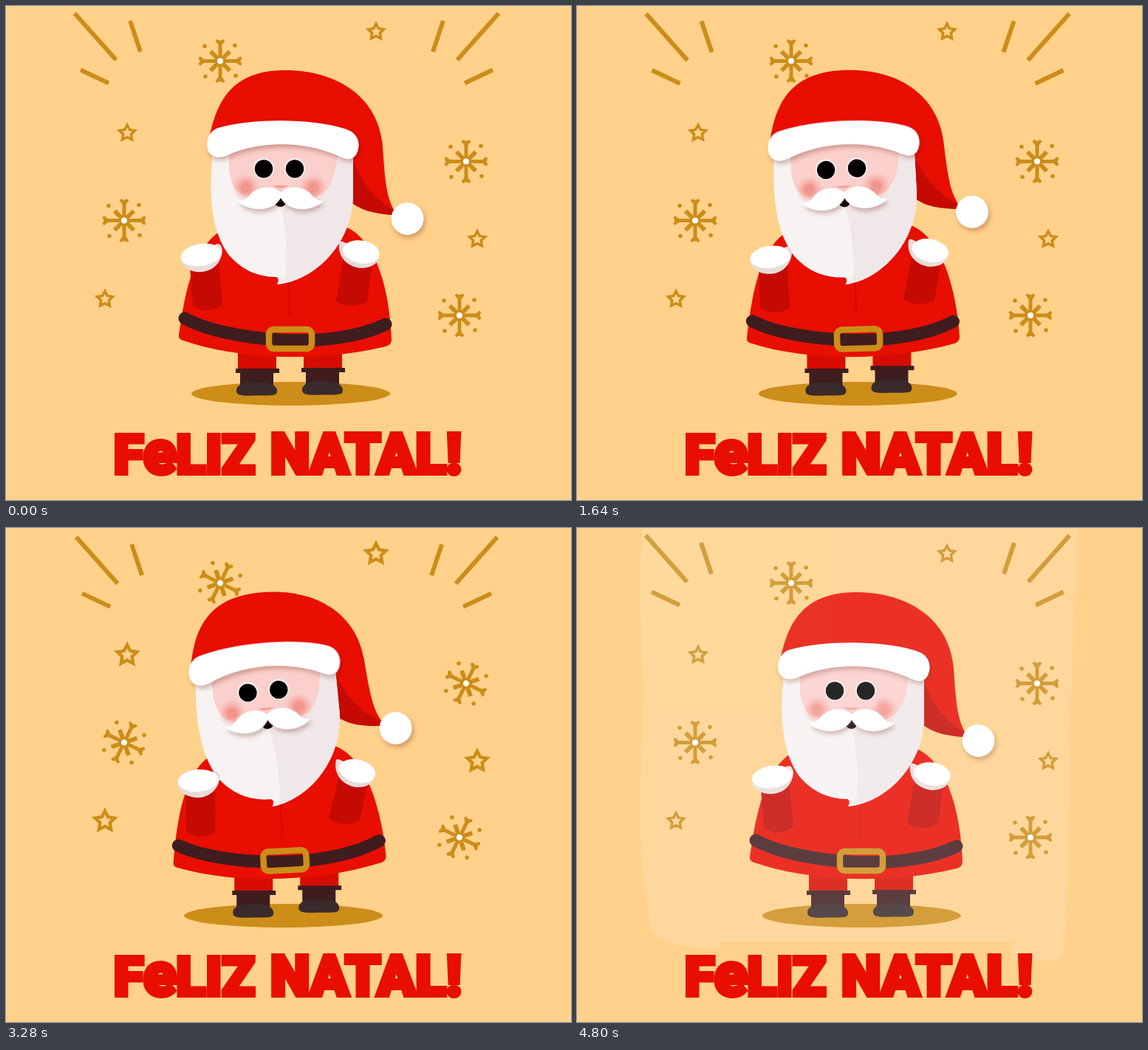
These frames come from a looping animation (765x669 px, 4840 ms). An HTML page without scripts:

```html
<!DOCTYPE html>
<html lang="pt">
<head>
<meta charset="utf-8">
<title>Feliz Natal!</title>
<style>
  @property --t { syntax: '<angle>'; inherits: true; initial-value: 0deg; }

  html, body { margin: 0; width: 100%; height: 100%; overflow: hidden; background: #ffd18b; }

  /* --t advances 18deg per 40ms step: one sway every 800ms */
  svg {
    display: block; width: 765px; height: 669px;
    animation: clock 4840ms steps(121) -2ms infinite;
    --s: calc(-1 * sin(var(--t)));
    --up: calc(1 - cos(var(--t)));
  }
  @keyframes clock { to { --t: 2178deg; } }

  .red { fill: #e80e00; }
  .dark { fill: #c50a04; }
  .maroon { fill: #3f1c1e; }
  .gold { fill: #cc8d19; }
  .white { fill: #fff; }
  .line { fill: none; stroke: #cc8d19; }
  .lift { filter: drop-shadow(2px 4px 3px rgba(110, 30, 20, .32)); }

  .rays { stroke-width: 6; transform: translate(calc(var(--in) * var(--up)), calc(11.2px * var(--up))); }
  .spin { animation: spin 4840ms -2ms infinite; }
  .star {
    stroke-width: 3.5;
    scale: calc(1.13 - .13 * clamp(-1, 20 * sin(var(--t) * 2 / 3 + 5deg), 1));
  }

  .shadow { transform: translateX(calc(17px * var(--s) + 1px * var(--up))); }
  .leg {
    transform: translate(calc(8.5px * var(--s) + 1.2px * var(--up)),
      calc(-1px * clamp(0, 5 * var(--up) + 8 * var(--side) * var(--s), 12)));
  }
  .body {
    transform-origin: 387px 447px;
    transform: translate(calc(13.3px * var(--s) + 1.3px * var(--up)), calc(-3.8px * var(--up)))
      rotate(calc(5.2deg * var(--s)));
  }
  .arm { transform: rotate(calc(-12.7deg * var(--s) + 1.8deg * var(--side) * var(--up))); }
  /* the head leans a little further to the right than to the left */
  .head {
    transform-origin: 369px 377px;
    transform: translate(calc(11px * var(--s) + 1.3px * var(--up)),
      calc(-3.6px * var(--up) - 1.8px * var(--s) - 1.5px * var(--s) * var(--s)))
      rotate(calc(10.8deg * var(--s) + 2deg * var(--s) * var(--s)));
  }

  .veil { fill: #fff; opacity: 0; animation: veil 4840ms linear -2ms infinite; }
  .title {
    font: 900 73px Roboto, sans-serif;
    fill: #e80e00; stroke: #e80e00; stroke-width: 6; stroke-miterlimit: 3;
  }

  @keyframes spin {
    0%, 9.9%, 33%, 59.5%, 82.6%, 100% { rotate: 0deg; }
    12.4%, 25%, 62%, 74.6% { rotate: 26deg; }
    28.1%, 78.2% { rotate: -4deg; }
  }
  @keyframes veil { 0%, 90.5% { opacity: 0; } 99.1%, 100% { opacity: .15; } }
</style>
</head>
<body>
<svg viewBox="0 0 765 669">
  <defs>
    <path id="rays" class="line" d="M93 10L149 73M168 20L182 62M101 86.500L139 104.500"/>
    <path id="star" class="line" d="M0-11L3.300-4.500 10.500-3.400 5.300 1.700 6.500 8.900 0 5.600-6.500 8.900-5.300 1.700-10.500-3.400-3.300-4.500Z"/>
    <g id="flake-arm">
      <path class="line" stroke-width="5" d="M0 0V-28"/>
      <path class="line" stroke-width="6" d="M0 0L13-13"/>
      <path class="line" stroke-width="4" d="M-5-28.500L0-22 5-28.500"/>
      <circle class="gold" cx="20" cy="-21" r="2.800"/>
    </g>
    <g id="flake">
      <use href="#flake-arm"/>
      <use href="#flake-arm" transform="rotate(90)"/>
      <use href="#flake-arm" transform="rotate(180)"/>
      <use href="#flake-arm" transform="rotate(270)"/>
      <circle class="white" r="4"/>
    </g>
    <g id="leg">
      <path fill="#d60c02" d="M314 440H366V493H314Z"/>
      <path class="maroon" d="M311 491H370V497H362V518H317V497H311Z"/>
      <path fill="#3a2a2b" d="M312 521C312 512 324 509 340 509S367 513 367 521 360 527 340 527.500 312 528 312 521Z"/>
    </g>
    <radialGradient id="blush">
      <stop offset=".3" stop-color="#f0877d" stop-opacity=".8"/>
      <stop offset="1" stop-color="#f4a59d" stop-opacity="0"/>
    </radialGradient>
  </defs>

  <rect width="765" height="669" fill="#ffd18b"/>

  <g class="rays" style="--in:11px"><use href="#rays"/></g>
  <g class="rays" style="--in:-9.8px"><use href="#rays" transform="matrix(-1 0 0 1 760 0)"/></g>

  <use href="#flake" class="spin" style="translate:290px 74.5px"/>
  <use href="#flake" class="spin" style="translate:623px 210.5px"/>
  <use href="#flake" class="spin" style="translate:160px 290.5px"/>
  <use href="#flake" class="spin" style="translate:614px 419px"/>

  <use href="#star" class="star" style="translate:501px 35px"/>
  <use href="#star" class="star" style="translate:164px 172px"/>
  <use href="#star" class="star" style="translate:638px 316px"/>
  <use href="#star" class="star" style="translate:134px 397px"/>

  <ellipse class="shadow gold" cx="385.5" cy="525" rx="134.5" ry="16"/>
  <g class="leg" style="--side:1"><use href="#leg"/></g>
  <g class="leg" style="--side:-1"><use href="#leg" x="89" y="-1"/></g>

  <g class="body">
    <path class="red" d="M234 446C240 405 250 330 290 305L462 300C500 318 519 380 522 452Q522 459 514 461C430 482 320 480 243 454Q233 452 234 446Z"/>
    <path d="M383 370V420" stroke="#b90a04"/>
    <path d="M242 423C300 454 440 467 514 431" fill="none" stroke="#3f1c1e" stroke-width="17" stroke-linecap="round"/>
    <rect class="line" x="356" y="438" width="58" height="26" rx="7" stroke-width="8.5"/>
  </g>

  <g class="head">
    <path class="red" d="M275 180C285 130 305 88 375 87C450 86 505 125 510 190C513 235 515 258 525 276L522 283C500 280 480 276 466 262L455 180Z"/>
    <path class="dark" d="M468 203C482 245 505 265 525 277L524 283C495 281 480 276 466 265Z"/>
    <path fill="#f7f3f2" d="M281 190C274 250 276 300 300 335C320 360 345 367 366 367Q371 369 367 377C420 372 470 320 470 255V190Z"/>
    <path fill="#f0e8e8" d="M372 270C381 310 381 345 378 366Q374 373 367 377C420 372 470 320 470 255V190H448C450 255 420 275 372 270Z"/>
    <path fill="#fbcfcb" d="M302 188V222Q305 255 330 258H420Q448 250 450 188Z"/>
    <circle cx="325" cy="246" r="19" fill="url(#blush)"/>
    <circle cx="416" cy="246" r="19" fill="url(#blush)"/>
    <path fill="#f0a097" d="M361 243H382Q372 250 361 243Z"/>
    <g fill="#fff" fill-opacity=".7">
      <circle cx="349" cy="220" r="14"/>
      <circle cx="391" cy="220" r="14"/>
    </g>
    <circle cx="349" cy="220.5" r="12.2"/>
    <circle cx="391" cy="220.5" r="12.2"/>
    <ellipse cx="371.5" cy="266" rx="7.5" ry="6"/>
    <path class="white lift" d="M372 252C358 240 338 246 330 256Q324 264 314 264C330 280 362 279 372 260C382 279 414 280 430 264Q420 264 414 256C406 246 386 240 372 252Z"/>
    <path class="white lift" d="M291 164C335 152 415 152 458 166C477 171 480 186 476 197C472 209 462 209 452 204C405 182 345 182 300 202C284 209 272 202 272 188C272 175 280 166 291 164Z"/>
    <circle class="white lift" cx="543.5" cy="288" r="22"/>
  </g>

  <g class="body">
    <g class="arm" style="--side:1;transform-origin:272px 406px">
      <path class="dark" d="M249 352L253 406Q272 419 293 405L287 340Z"/>
      <path fill="#e8dcd9" d="M237 345C240 356 252 361 266 360C282 358 292 346 293 331Q292 322 286 322Z"/>
      <ellipse class="white" cx="264" cy="337" rx="27.5" ry="15" transform="rotate(-9 264 337)"/>
    </g>
    <g class="arm" style="--side:-1;transform-origin:468px 402px">
      <path class="dark" d="M457 340L447 400Q466 412 489 400L496 348Z"/>
      <path fill="#e8dcd9" d="M451 321C449 340 462 353 480 355C494 355 503 349 505 341L458 320Q452 317 451 321Z"/>
      <ellipse class="white" cx="481" cy="333" rx="25" ry="15.5" transform="rotate(10 481 333)"/>
    </g>
  </g>

  <path class="veil" d="M88 0Q84 60 86 120C92 250 84 330 86 420Q90 500 102 548Q120 570 192 569V560H588V584L640 586Q660 586 660 570C670 430 664 300 672 150L678 0Z"/>

  <text class="title" x="146" y="633">F<tspan font-size="82">e</tspan>LIZ <tspan x="358" font-size="76">NATAL!</tspan></text>
</svg>
</body>
</html>
```
